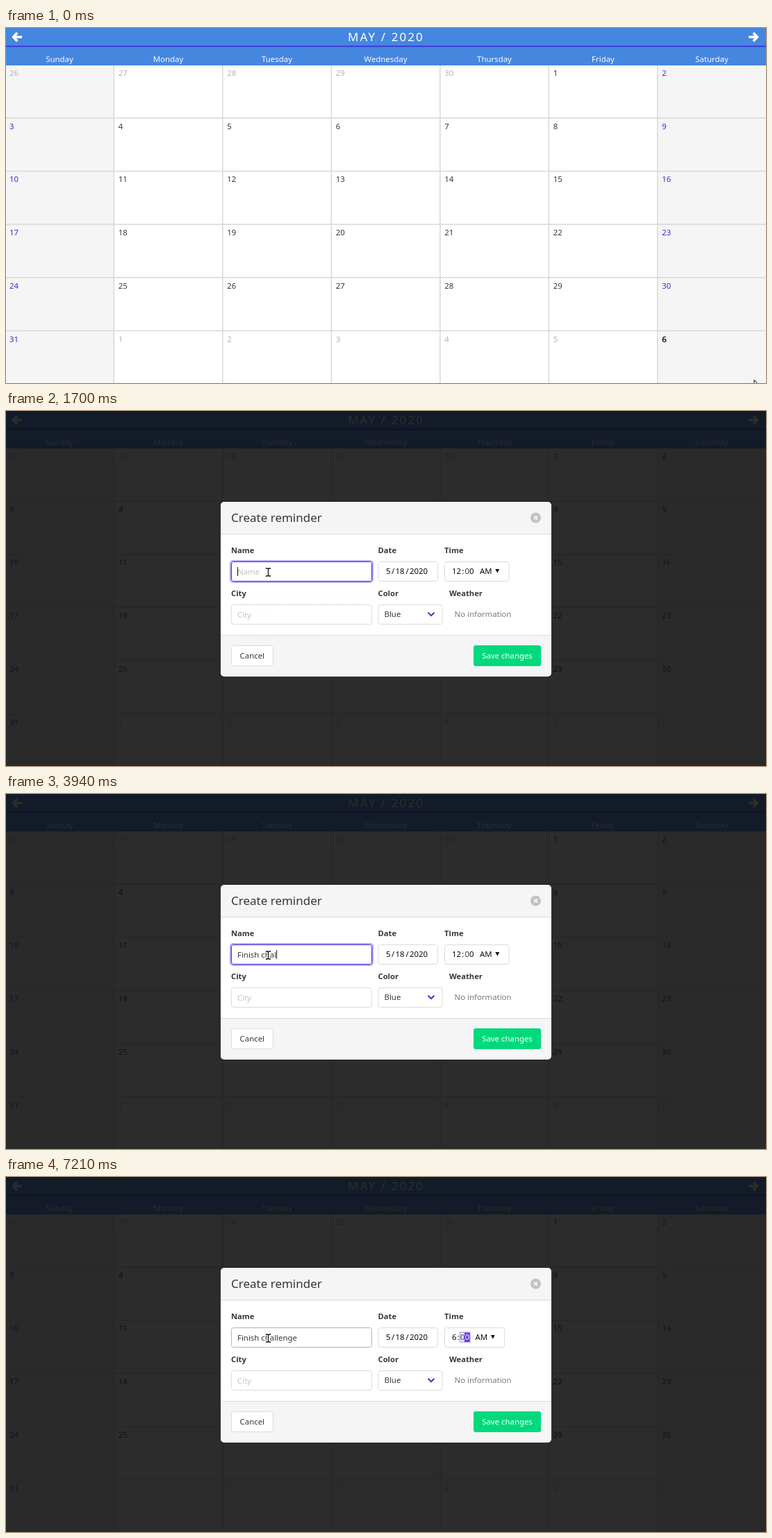
Write an HTML page that moves like this. It is 1094 px wide and 512 px high and loops after 8 s.

```html
<!DOCTYPE html>
<html lang="en">
<head>
<meta charset="utf-8">
<title>Calendar reminder</title>
<style>
  html, body { margin: 0; width: 100%; height: 100%; overflow: hidden; background: #fff; }
  svg { display: block; width: 100vw; height: 100vh; }
  text { font: 11.4px "Noto Sans", "Open Sans", sans-serif; fill: #363636; white-space: pre; }
  .title { font-size: 17px; letter-spacing: 2.1px; fill: #fff; }
  .heading { font-size: 17px; }
  .mid { text-anchor: middle; }
  .white { fill: #fff; }
  .bold { font-weight: 700; font-size: 11.2px; }
  .hint { fill: #c3c3c3; }
  .muted { fill: #7a7a7a; }
  .dark { fill: #0a0a0a; }
  .other { fill: #b5b5b5; }
  .weekend { fill: #4527d8; }
  .hover { fill: #000; stroke: #000; stroke-width: .3px; }
  .popup { font-size: 12.3px; fill: #333; }
  .popup.small { font-size: 11.4px; fill: #666; }
  .popup.manage { fill: #555; stroke: #555; stroke-width: .2px; }
  .box { fill: #fff; stroke: #dbdbdb; }
</style>
</head>
<body>
<svg id="stage" viewBox="0 0 1094 512" preserveAspectRatio="none">
  <defs>
    <filter id="shadow" x="-10%" y="-10%" width="120%" height="130%">
      <feDropShadow dx="0" dy="1" stdDeviation="1.5" flood-opacity=".3"/>
    </filter>
  </defs>
  <g id="calendar"></g>
  <g id="dialog"></g>
  <path id="arrow" d="M.5 .5V14.2L3.7 11.3L6 16.6L8.4 15.6L6.1 10.4H10.2Z" fill="#fff" stroke="#000" stroke-linejoin="round"/>
  <g id="beam" fill="none" stroke-linecap="square">
    <path d="M-3 -5.5H-1L0 -4.5L1 -5.5H3M0 -4V4M-3 5.5H-1L0 4.5L1 5.5H3" stroke="#fff" stroke-width="3"/>
    <path d="M-3 -5.5H-1L0 -4.5L1 -5.5H3M0 -4V4M-3 5.5H-1L0 4.5L1 5.5H3" stroke="#111" stroke-width="1.3"/>
  </g>
</svg>
<script>
const LOOP = 8000;
const COL = 156.5, ROW = 76.7, TOP = 54;
const OPEN = 900, DIGIT = 6.52;
const TASK = 'Finish challenge';
const KEYS = [2140, 2480, 2640, 2800, 2940, 3000, 3140, 3400,
              3550, 3770, 3940, 4440, 4520, 4600, 4770, 4840];
const FOCUS = [[0, ''], [1700, 'name'], [5310, 'month'], [5940, 'day'],
               [6110, 'year'], [6440, 'hour'], [7210, 'minute']];
const DAYS = ['Sunday', 'Monday', 'Tuesday', 'Wednesday', 'Thursday', 'Friday', 'Saturday'];

const $ = id => document.getElementById(id);
const clamp = v => Math.min(1, Math.max(0, v));
const ramp = (t, from, to) => clamp((t - from) / (to - from));
const ease = p => p * p * (3 - 2 * p);
const mix = (a, b, p) => a + (b - a) * p;

const text = (x, y, str, cls = '', more = '') =>
  `<text x="${x}" y="${y}" class="${cls}" ${more}>${str}</text>`;
const rect = (x, y, w, h, fill, more = '') =>
  `<rect x="${x}" y="${y}" width="${w}" height="${h}" fill="${fill}" ${more}/>`;
const box = (x, y, w, h, more = '') =>
  `<rect x="${x + .5}" y="${y + .5}" width="${w - 1}" height="${h - 1}" rx="3" class="box" ${more}/>`;

function dayCell(i) {
  const col = i % 7, row = Math.floor(i / 7);
  const offset = i - 4;
  const inMonth = offset >= 1 && offset <= 31;
  const day = offset < 1 ? offset + 30 : (offset - 1) % 31 + 1;
  const cls = !inMonth ? 'other' : col % 6 === 0 ? 'weekend' : '';
  return text(col ? 5.3 + COL * col : 5, (69 + ROW * row).toFixed(1), day, cls, `id="day${i}"`);
}

function drawCalendar() {
  const header = rect(0, 0, 1094, TOP, '#4586df') + rect(0, 25.6, 1094, 1.6, '#3b2bd6') +
    text(492, 19, 'MAY / 2020', 'title') +
    '<path d="M16.2 7L10.6 13L16.2 19M11.5 13H23M1075.8 7L1081.4 13L1075.8 19M1080.5 13H1069" fill="none" stroke="#fff" stroke-width="3.5"/>' +
    DAYS.map((d, i) => text(77 + COL * i, 48.6, d, 'mid white')).join('');
  let cells = rect(0, TOP, 1094, 458, '#fff') +
    rect(0, TOP, 155, 458, '#f5f5f5') + rect(939, TOP, 155, 458, '#f5f5f5');
  for (let i = 0; i < 6; i++) cells += rect(154.5 + COL * i, TOP, 1.7, 458, '#dbdbdb');
  for (let i = 0; i < 5; i++) cells += rect(0, 129 + ROW * i, 1094, 1.7, '#dbdbdb');
  for (let i = 0; i < 42; i++) cells += dayCell(i);
  $('calendar').innerHTML = cells + header;
}

function drawDialog() {
  $('dialog').innerHTML =
    rect(0, 0, 1094, 512, '#0a0a0a', 'opacity=".86"') +
    rect(309, 131, 476, 252, '#f5f5f5', 'rx="5"') +
    rect(309, 178, 476, 145, '#fff') +
    rect(309, 177, 476, 1, '#dbdbdb') + rect(309, 323, 476, 1, '#dbdbdb') +
    text(324, 160, 'Create reminder', 'heading') +
    '<circle cx="762.5" cy="154" r="7.5" fill="#c2c2c2"/>' +
    '<path d="M760 151.5l5 5m0-5l-5 5" stroke="#fff" stroke-width="1.6"/>' +
    text(324, 205, 'Name', 'bold') + text(535.5, 205, 'Date', 'bold') + text(631, 205, 'Time', 'bold') +
    text(324, 267, 'City', 'bold') + text(535.5, 267, 'Color', 'bold') + text(638, 267, 'Weather', 'bold') +
    rect(323, 216, 205, 31, 'none', 'id="ring" rx="4" stroke="#5a36e6" stroke-opacity=".6" stroke-width="1.5"') +
    box(324, 217, 203, 29, 'id="nameBox"') + text(333, 235.6, '', '', 'id="name"') +
    rect(0, 225, 1, 13, '#222', 'id="caret"') +
    box(535.5, 217, 86.5, 29) + '<g id="date"></g><g id="time"></g>' +
    box(324, 279, 203, 29) + text(333, 297.6, 'City', 'hint') +
    box(535.5, 279, 93, 29) + text(544.5, 297.2, 'Blue') +
    '<path d="M607.6 290.8l4.4 4.4l4.4-4.4" fill="none" stroke="#4527d8" stroke-width="2"/>' +
    text(645.5, 297.2, 'No information', 'muted') +
    box(324, 338, 61, 30) + text(354.3, 357.2, 'Cancel', 'mid') +
    rect(673, 338, 97, 30, '#00d97c', 'rx="3"') + text(721.5, 357.2, 'Save changes', 'mid white') +
    '<g id="popup">' + rect(326, 248, 244.5, 94, '#fff', 'rx="2" filter="url(#shadow)"') +
    rect(326, 308, 244.5, 34, '#f7f7f7') + rect(326, 307.5, 244.5, 1, '#e6e6e6') +
    text(336, 273, 'CAIO FERVALDO DOS MONTES RIZO', 'popup') +
    text(336, 291, 'Campinas', 'popup small') +
    text(336, 329.5, 'Manage addresses…', 'popup manage') + '</g>';
}

const segment = (x, str, active) =>
  (active ? rect(x - .5, 224.5, str.length * DIGIT + 1, 13.5, '#6a35f2') : '') +
  text(x, 235, str, active ? 'white' : 'dark');

function dateMarkup(focus) {
  return segment(547, '5', focus === 'month') + text(555, 235, '/', 'dark') +
    segment(560.5, '18', focus === 'day') + text(575.5, 235, '/', 'dark') +
    segment(581, '2020', focus === 'year');
}

function timeMarkup(focus, hour) {
  const shift = hour.length === 1 ? -DIGIT : 0;
  const active = focus === 'minute';
  const x = 660.5 + shift;
  return box(631, 217, 93.5 + shift, 29) +
    segment(642, hour, focus === 'hour') + text(656.3 + shift, 235, ':', 'dark') +
    (active ? rect(x - .5, 224, 14.5, 14, '#f4f1ff', 'stroke="#8f70f5" stroke-width=".9"') : '') +
    text(x, 235, '0', '') + segment(x + DIGIT, '0', active) +
    text(682 + shift, 235, 'AM', 'dark') +
    `<path d="M${704.3 + shift} 228h6l-3 5.6z" fill="#111"/>`;
}

function pointer(t) {
  if (t < OPEN) {
    const p = ease(ramp(t, 0, 670));
    return [mix(1076.5, 238, p), mix(507, 300, p)];
  }
  const p = ease(ramp(t, OPEN, 1500));
  return [mix(238, 377.5, p), mix(300, 232.5, p)];
}

const cache = {};
function setMarkup(id, markup) {
  if (cache[id] !== markup) $(id).innerHTML = cache[id] = markup;
}
const show = (id, on) => $(id).setAttribute('visibility', on ? 'inherit' : 'hidden');

let hovered = null;
function hoverDay(index) {
  if (hovered === index) return;
  if (hovered !== null) $('day' + hovered).classList.remove('hover');
  if (index !== null) $('day' + index).classList.add('hover');
  hovered = index;
}

drawCalendar();
drawDialog();
$('name').textContent = TASK;
const caretStops = [0, ...[...TASK].map((_, i) => $('name').getSubStringLength(0, i + 1))];

function render(t) {
  const [x, y] = pointer(t);
  const open = t >= OPEN;
  const overName = open && x > 324 && x < 527 && y > 217 && y < 246;
  const focus = FOCUS.filter(([at]) => t >= at).pop()[1];
  const typed = KEYS.filter(at => t >= at).length;
  const editing = focus === 'name';

  show('dialog', open);
  hoverDay(open ? null : Math.floor((y - TOP) / ROW) * 7 + Math.min(6, Math.floor((x + 1) / COL)));

  setMarkup('name', typed ? TASK.slice(0, typed) : 'Name');
  $('name').setAttribute('class', typed ? '' : 'hint');
  $('nameBox').style.stroke = editing ? '#4a27dc' : overName ? '#b5b5b5' : '#dbdbdb';
  show('ring', editing);
  show('caret', editing);
  $('caret').setAttribute('x', 333 + caretStops[typed]);
  $('popup').setAttribute('opacity', ramp(t, 1700, 1870) * (1 - ramp(t, 2300, 2560)));

  setMarkup('date', dateMarkup(focus));
  setMarkup('time', timeMarkup(focus, t < 7170 ? '12' : '6'));

  for (const id of ['arrow', 'beam']) $(id).setAttribute('transform', `translate(${x} ${y})`);
  $('arrow').setAttribute('visibility', overName ? 'hidden' : 'visible');
  $('beam').setAttribute('visibility', overName ? 'visible' : 'hidden');
}

const start = performance.now();
function tick() {
  render((performance.now() - start) % LOOP);
  requestAnimationFrame(tick);
}
tick();
</script>
</body>
</html>
```
